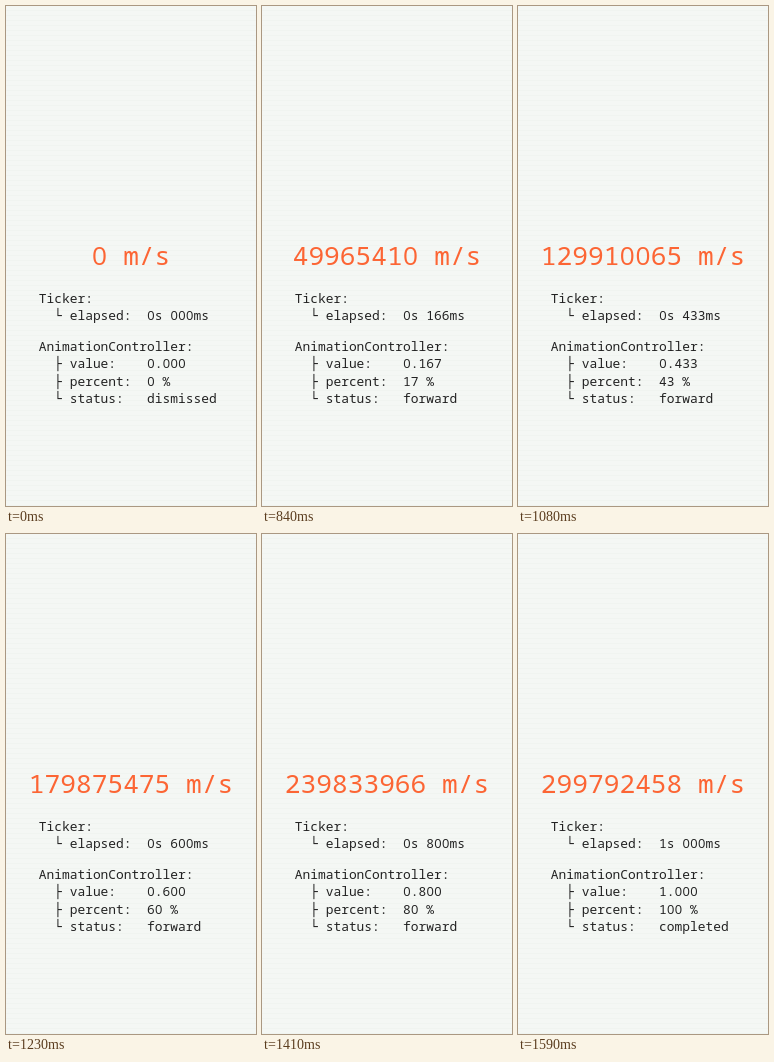
An HTML page for the animation above (6390 ms loop, 250 by 500 pixels).

```html
<!DOCTYPE html>
<html lang="en">
<head>
<meta charset="utf-8">
<title>Speed ticker</title>
<style>
  html, body { margin: 0; width: 100%; height: 100%; overflow: hidden; }
  body { background: repeating-linear-gradient(#f4f7f4 0 4px, #f0f4f0 4px 5px); }
  svg { display: block; width: 250px; height: 500px; }
  text {
    font: 12.9px "Noto Sans Mono", monospace;
    fill: #222;
    text-anchor: middle;
    white-space: pre;
  }
  #speed { font-size: 26.2px; fill: #fc6534; }
  .zero { font-family: "Open Sans", sans-serif; }
  .branch { font-family: "DejaVu Sans Mono", monospace; }
</style>
</head>
<body>
<svg id="stage" viewBox="0 0 250 500"></svg>
<script>
const LOOP = 6390, START = 720, STEP = 30, STEPS = 30;
const LIGHT = 299792458;
const BIG = 15.72, SMALL = 7.74, LEFT = 32.7;
const stage = document.getElementById('stage');

function line(y, id) {
  const el = document.createElementNS('http://www.w3.org/2000/svg', 'text');
  el.setAttribute('y', y);
  if (id) el.id = id;
  stage.append(el);
  return el;
}

// Set text on a monospaced grid; zeros and branches use their own fonts.
function print(el, str, left, cell) {
  const xs = [...str].map((_, i) => (left + (i + 0.5) * cell).toFixed(2));
  el.setAttribute('x', xs.join(' '));
  el.innerHTML = str
    .replace(/0/g, '<tspan class="zero">0</tspan>')
    .replace(/[├└]/g, '<tspan class="branch">$&</tspan>');
}

const speed = line(259, 'speed');
const rows = [297.3, 314.3, 345.3, 362.3, 379.8, 397.4].map(y => line(y));

function draw(n) {
  const value = n / STEPS;
  const ms = Math.floor(n * 1000 / STEPS);
  const status = n === 0 ? 'dismissed' : n < STEPS ? 'forward' : 'completed';
  const big = Math.round(LIGHT * n / STEPS) + ' m/s';
  print(speed, big, 125 - big.length * BIG / 2, BIG);
  [
    'Ticker:',
    `  └ elapsed:  ${Math.floor(ms / 1000)}s ${String(ms % 1000).padStart(3, '0')}ms`,
    'AnimationController:',
    `  ├ value:    ${value.toFixed(3)}`,
    `  ├ percent:  ${Math.round(value * 100)} %`,
    `  └ status:   ${status}`
  ].forEach((str, i) => print(rows[i], str, LEFT, SMALL));
}

let shown = -1;
const begin = performance.now();

function tick() {
  const t = (performance.now() - begin) % LOOP;
  const n = t < START ? 0 : Math.min(STEPS, Math.floor((t - START) / STEP) + 1);
  if (n !== shown) draw(shown = n);
  requestAnimationFrame(tick);
}
tick();
</script>
</body>
</html>
```
